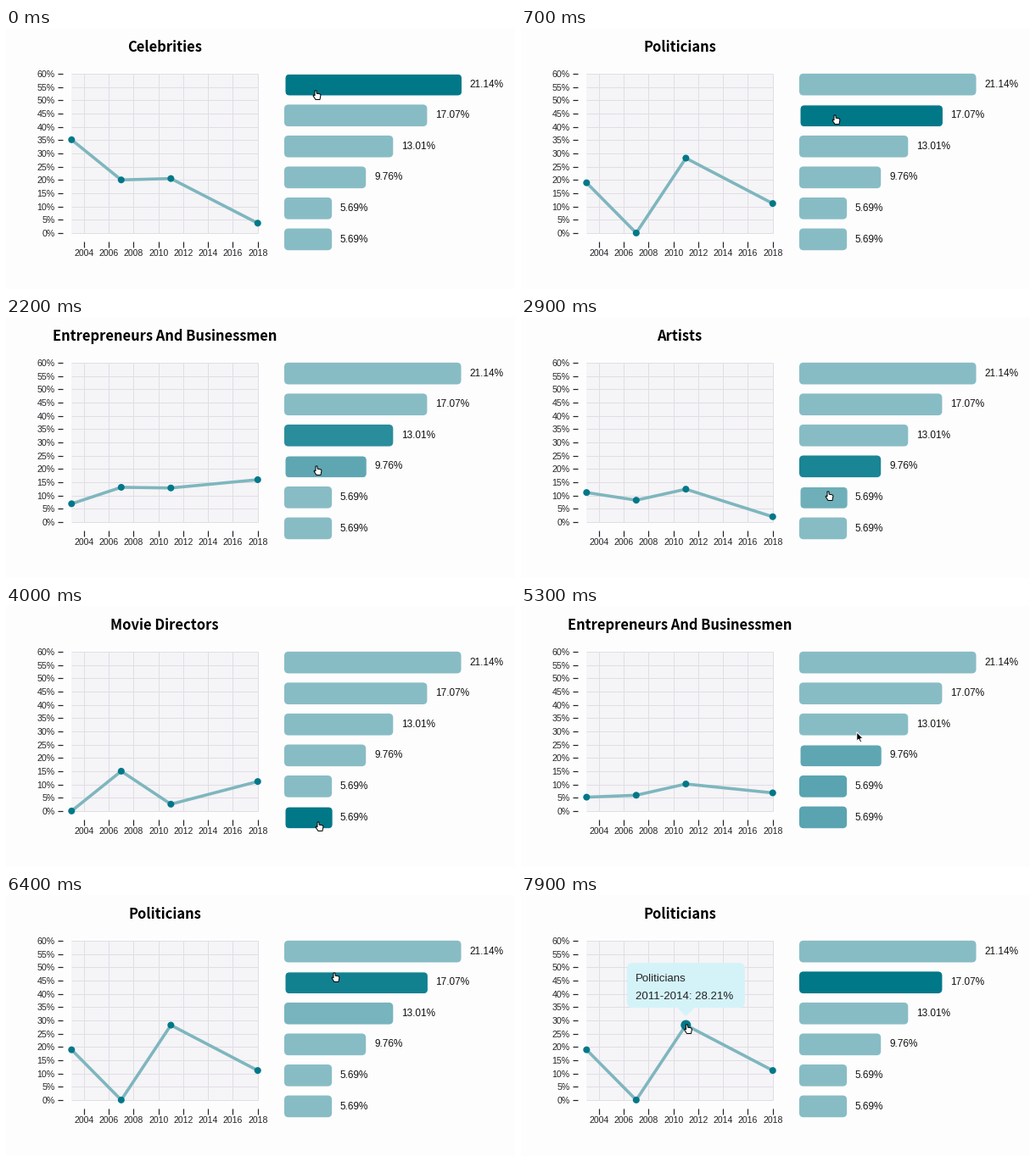
A matplotlib script for the animation above (8000 ms loop, 600 px wide and 308 px high).

```python
import numpy as np
import matplotlib.pyplot as plt
from matplotlib.animation import FuncAnimation
from matplotlib.colors import to_rgb
from matplotlib.patches import Circle, FancyBboxPatch, Polygon

W, H, DPI = 600, 308, 100
STEP, LOOP = 100, 8000
LIGHT, DARK, LINE = (np.array(to_rgb(c)) for c in ("#88bcc5", "#007888", "#7eb6be"))
PAPER, INK, GRID, TIP = "#fefdfe", "#222426", "#e0dee3", "#d4f3f8"
SANS = "Liberation Sans"
BAR_X, BAR_H = 328, 25.7

TITLES = ["Celebrities", "Politicians", "Writers",
          "Entrepreneurs And Businessmen", "Artists", "Movie Directors"]
YEARS = np.array([2003, 2007, 2011, 2018])
PERIOD_SIZE = np.array([37, 20, 39, 27])
COUNTS = np.array([[13, 4, 8, 1], [7, 0, 11, 3], [1, 3, 5, 7],
                   [5, 2, 5, 0], [0, 0, 4, 3], [0, 3, 1, 3]])
SHARES = 100 * COUNTS / PERIOD_SIZE
TOTALS = COUNTS.sum(axis=1)

# the pointer's moves: start, duration, goal x, goal y
HOME = (365, 74)
MOVES = [(0, 60, 370, 103), (700, 390, 373, 135), (1700, 390, 366, 176),
         (2600, 120, 362, 206), (3360, 140, 368, 255), (4600, 800, 397, 144),
         (5880, 120, 387, 92), (6700, 250, 136, 235), (7100, 280, 195.5, 153)]
REACT = 140  # delay between pointing and the page's answer

HAND = np.array([(-1, 0), (1, 0), (1.2, 3.2), (5, 3.8), (6, 5.2), (5, 10.5),
                 (0, 10.5), (-3, 6), (-2, 5), (-1, 6)])
ARROW = np.array([(0, 0), (0, 10.5), (2.4, 8.4), (4.1, 12.2), (5.9, 11.4),
                  (4.2, 7.8), (7.4, 7.6)])


def pt(px):
    return px * 72 / DPI


def year_x(year):
    return 77.3 + (year - 2003) * 14.63


def share_y(share):
    return 241.9 - share * 3.132


def bar_y(i):
    return 53.8 + 36.55 * i


def bar_w(i):
    return TOTALS[i] * 8.02


def smooth(u):
    return u * u * (3 - 2 * u)


def linear(u):
    return u


def pointer_at(t):
    pos = np.array(HOME, float)
    for start, dur, x, y in MOVES:
        pos += (np.array((x, y)) - pos) * smooth(np.clip((t - start) / dur, 0, 1))
    return pos


def bar_under(pos):
    x, y = pos
    for i in range(len(TOTALS)):
        if 0 <= x - BAR_X <= bar_w(i) and 0 <= y - bar_y(i) <= BAR_H:
            return i
    return None


def point_under(pos, shares):
    near = np.hypot(year_x(YEARS) - pos[0], share_y(shares) - pos[1]) < 9
    return int(np.argmax(near)) if near.any() else len(YEARS)


def find_events():
    """Times at which the chosen bar and the chosen point change."""
    bars, points = [(-LOOP, 0)], [(-LOOP, len(YEARS))]
    for t in range(0, LOOP, 5):
        pos = pointer_at(t - REACT)
        bar = bar_under(pos)
        if bar is not None and bar != bars[-1][1]:
            bars.append((t, bar))
        point = point_under(pos, SHARES[bars[-1][1]])
        if point != points[-1][1]:
            points.append((t, point))
    return bars, points


def latest(t, events):
    return [i for start, i in events if start <= t][-1]


def tween(t, events, targets, dur, ease):
    """Value at t when every event restarts the move from where it stands."""
    value = targets[events[0][1]]
    ends = [start for start, _ in events[1:]] + [np.inf]
    for (start, i), end in zip(events, ends):
        if start > t:
            break
        u = ease(min((min(t, end) - start) / dur, 1))
        value = value + (targets[i] - value) * u
    return value


BAR_EVENTS, POINT_EVENTS = find_events()
BAR_LEVELS = np.eye(len(TOTALS))
POINT_LEVELS = np.eye(len(YEARS) + 1)[:, :-1]  # last row: no point chosen

fig = plt.figure(figsize=(W / DPI, H / DPI), dpi=DPI, facecolor=PAPER)
ax = fig.add_axes([0, 0, 1, 1])
ax.set(xlim=(0, W), ylim=(H, 0))
ax.axis("off")


def text(x, y, s, size, **kw):
    kw = {"family": SANS, "color": INK, "va": "baseline", **kw}
    return ax.text(x, y, s, fontsize=pt(size), **kw)


def segment(xs, ys, color, width, z=1):
    return ax.plot(xs, ys, color=color, lw=pt(width), zorder=z,
                   solid_capstyle="butt", solid_joinstyle="round")[0]


def round_box(x, y, w, h, r, color, z):
    box = FancyBboxPatch((x, y), w, h, boxstyle=f"round,pad=0,rounding_size={r}",
                         fc=color, ec="none", lw=pt(1), zorder=z)
    return ax.add_patch(box)


# chart frame
left, right, top, bottom = year_x(2003), year_x(2018), share_y(60), share_y(0)
ax.fill([left, right, right, left], [top, top, bottom, bottom], color="#f5f4f7", lw=0)
for share in range(0, 61, 5):
    y = share_y(share)
    segment([left, right], [y, y], GRID, 1)
    segment([60.5, 67], [y, y], INK, 1.2)
    text(57.5, y + 4, f"{share}%", 10.6, ha="right")
for year in range(2004, 2019, 2):
    x = year_x(year)
    segment([x, x], [top, bottom], GRID, 1)
    segment([x, x], [252, 258.5], INK, 1.2)
    text(x, 269.3, str(year), 10.5, ha="center")

# moving parts
title = text(187, 27.5, "", 16.5, ha="center", family="Noto Sans CJK JP",
             weight="bold", color="#000000")
curve = segment(year_x(YEARS), YEARS * 0, LINE, 3.6, 3)
dots = [ax.add_patch(Circle((x, 0), 4, fc=DARK, ec="none", zorder=4))
        for x in year_x(YEARS)]
bars = []
for i, total in enumerate(TOTALS):
    bars.append(round_box(BAR_X, bar_y(i), bar_w(i), BAR_H, 5, LIGHT, 2))
    text(BAR_X + bar_w(i) + 9.8, bar_y(i) + 16, f"{100 * total / TOTALS[0] * 0.2114:.2f}%",
         11.7, color="#111111")


def make_tooltip(point):
    year, share = YEARS[point], SHARES[1][point]
    period = f"{year}-{year + 3}: {round(share, 2)}%"
    width = 20 + 7 * len(period)
    x, y0 = year_x(year), share_y(share) - 73.5
    x0 = x - width / 2
    box = round_box(x0, y0, width, 53, 7, TIP, 6)
    caret = ax.add_patch(Polygon([(x - 10.5, y0 + 52.5), (x + 10.5, y0 + 52.5), (x, y0 + 63)],
                                 fc=TIP, ec="none", zorder=6))
    lines = [text(x0 + 10.5, y0 + dy, s, 13.2, zorder=7)
             for dy, s in ((21.5, TITLES[1]), (42.5, period))]
    return [box, caret, *lines]


tooltips = [make_tooltip(k) for k in range(len(YEARS))]
pointer = ax.add_patch(Polygon(HAND, closed=True, lw=pt(1), zorder=9))


def draw(frame):
    t = frame * STEP
    pos = pointer_at(t)
    chosen, point = latest(t, BAR_EVENTS), latest(t, POINT_EVENTS)

    title.set_text(TITLES[chosen])
    ys = share_y(tween(t, BAR_EVENTS, SHARES, 260, smooth))
    glow = tween(t, POINT_EVENTS, POINT_LEVELS, 200, linear)
    curve.set_ydata(ys)
    for k, x in enumerate(year_x(YEARS)):
        dots[k].center = x, ys[k]
        dots[k].set_radius(4 + 2 * glow[k])
        for part in tooltips[k]:
            part.set_alpha(glow[k])

    hovered = bar_under(pointer_at(t - REACT))
    levels = tween(t, BAR_EVENTS, BAR_LEVELS, 360, linear)
    for i, bar in enumerate(bars):
        active = i == hovered
        bar.set_facecolor(LIGHT + (DARK - LIGHT) * levels[i])
        bar.set_edgecolor(PAPER if active else "none")
        bar.set_x(BAR_X + active)
        bar.set_y(bar_y(i) + active * 0.5)

    hand = bar_under(pos) == chosen or point < len(YEARS)
    pointer.set_xy((HAND if hand else ARROW) + pos)
    pointer.set_facecolor("white" if hand else "black")
    pointer.set_edgecolor("black" if hand else "white")
    return []


anim = FuncAnimation(fig, draw, frames=LOOP // STEP, interval=STEP,
                     init_func=lambda: draw(0), repeat=True, repeat_delay=0)
plt.show()
```
